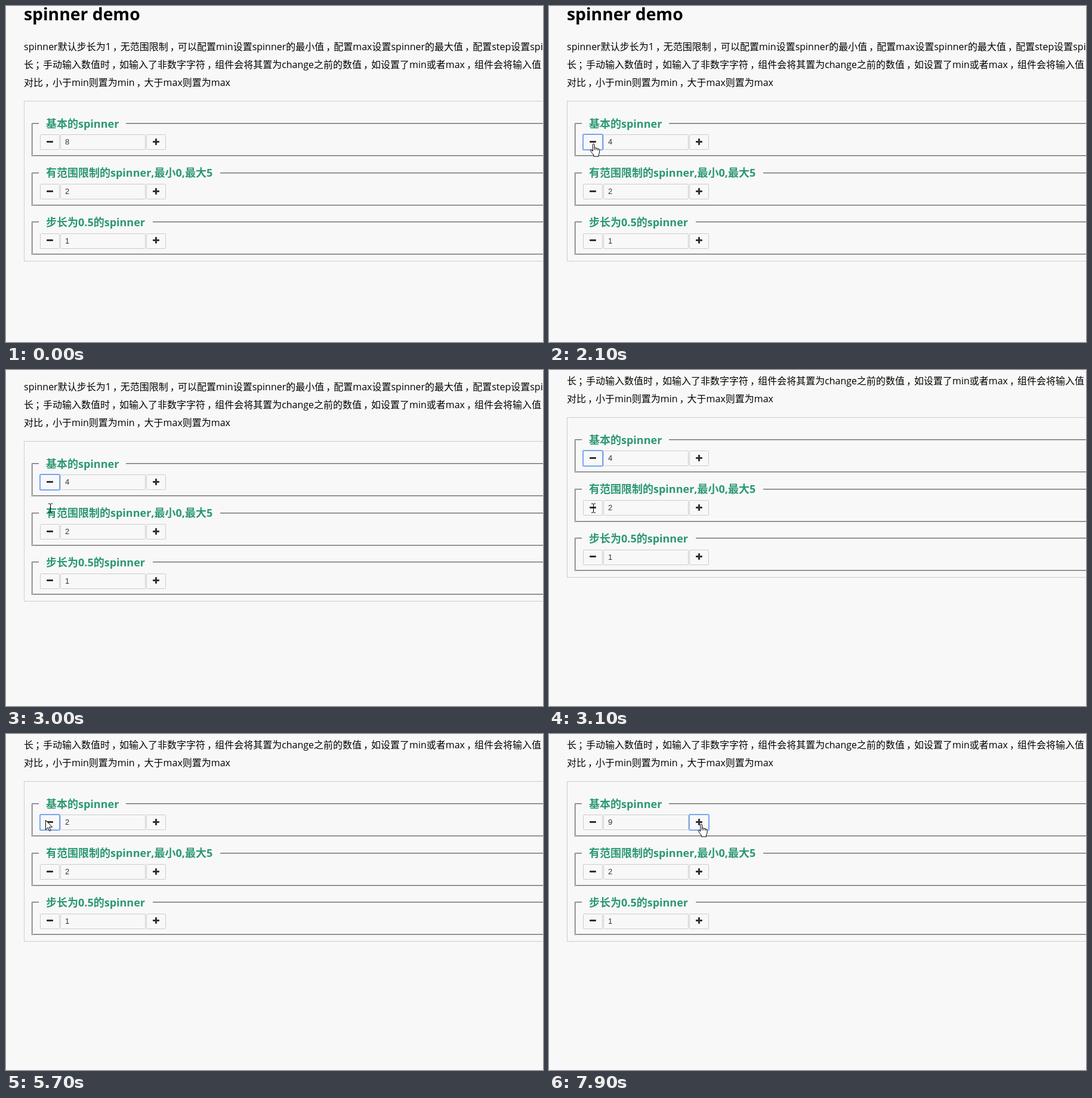
An HTML page that plays this animation: 900 by 563 pixels, repeating every 8 s.

```html
<!DOCTYPE html>
<html lang="zh-CN">
<head>
<meta charset="utf-8">
<title>spinner demo</title>
<style>
  html, body { margin: 0; width: 100%; height: 100%; overflow: hidden; background: #f8f8f8; }
  svg { display: block; }
  text { font-family: "Open Sans", "Noto Sans CJK SC", "Noto Sans CJK", sans-serif; white-space: pre; }
  .title { font-size: 28.3px; font-weight: 700; }
  .intro { font-size: 16px; }
  .legend { font-size: 18px; font-weight: 700; fill: #2b9872; }
  .value { font: 13px "Liberation Sans", Arial, sans-serif; fill: #333; }
  .thin { fill: none; stroke: #ccc; }
  .icon { fill: #332e38; }
  .ring { fill: none; stroke: #79a6f2; stroke-width: 2; }
  .dark { fill: none; stroke: #6c6c6c; }
  .light { fill: none; stroke: #c0c0c0; }
  .arrow, .hand { fill: #fff; stroke: #000; stroke-linejoin: round; }
  .beam { fill: none; stroke: #000; }
</style>
</head>
<body>
<svg width="900" height="563" viewBox="0 0 900 563">
  <g id="page">
    <text class="title" x="30" y="24">spinner demo</text>
    <g id="intro"></g>
    <rect class="thin" x="30.5" y="159.5" width="900" height="268"/>
    <g id="rows"></g>
    <rect id="ring" class="ring" y="215" width="33" height="26" rx="1.5"/>
  </g>
  <g id="cursor">
    <path class="arrow" d="M.5 .5V16.3L4.2 12.8L6.8 18.5L9 17.5L6.5 12H11.5Z"/>
    <g class="hand" transform="translate(-5.5 -.5)">
      <path d="M4.3 12.8V2Q4.3 .5 5.7 .5Q7.1 .5 7.1 2V7Q8.8 6.2 9.9 7.8Q11.8 7 12.8 8.7Q15.6 8.2 15.6 11V14.5Q15.4 17 14 18.6V21.5H6V19.6L3.3 15.8L.7 12.2Q.4 10.4 2.2 10.5Z"/>
      <path fill="none" d="M7.1 7V11M9.9 7.8V11M12.8 8.7V11.5"/>
    </g>
    <path class="beam" d="M-3.5 -7.5H-1L0 -6.5L1 -7.5H3.5M0 -6.5V6.5M-3.5 7.5H-1L0 6.5L1 7.5H3.5"/>
  </g>
</svg>
<script>
const LOOP = 8000;
const $ = id => document.getElementById(id);

const INTRO = [
  'spinner默认步长为1，无范围限制，可以配置min设置spinner的最小值，配置max设置spinner的最大值，配置step设置spinner的步',
  '长；手动输入数值时，如输入了非数字字符，组件会将其置为change之前的数值，如设置了min或者max，组件会将输入值',
  '对比，小于min则置为min，大于max则置为max'
];

// text, initial value, legend end, border top, legend baseline, control top, icon centre
const ROWS = [
  ['基本的spinner', 8, 201, 196, 204, 215, 227.5],
  ['有范围限制的spinner,最小0,最大5', 2, 359, 279, 286, 298, 310.5],
  ['步长为0.5的spinner', 1, 246, 361, 369, 381, 392.5]
];

// Fullwidth punctuation sits near the middle of its cell
const centred = line => line.replace(/([，；])(.)/g,
  '<tspan dx="3">$1</tspan><tspan dx="-3">$2</tspan>');
const box = (x, y, w) =>
  `<rect class="thin" x="${x + .5}" y="${y + .5}" width="${w - 1}" height="25" rx="1"/>`;
const bar = (x, y, w, h) =>
  `<rect class="icon" x="${x - w / 2}" y="${y - h / 2}" width="${w}" height="${h}" rx="1"/>`;

$('intro').innerHTML = INTRO.map((line, i) =>
  `<text class="intro" x="30" y="${74 + 30 * i}">${centred(line)}</text>`).join('');

$('rows').innerHTML = ROWS.map(([label, value, gap, top, base, y, mid]) => `
  <path class="dark" d="M55 ${top + .5}H43.5V${top + 56}M${gap} ${top + .5}H900M45 ${top + 54.5}H900"/>
  <path class="light" d="M55 ${top + 1.5}H44.5V${top + 54}M${gap} ${top + 1.5}H900M44 ${top + 55.5}H900"/>
  <text class="legend" x="67" y="${base}">${label}</text>
  ${box(57, y, 33)}${box(91, y, 143)}${box(235, y, 33)}
  ${bar(73.5, mid, 11, 3)}${bar(251.5, mid, 11, 3)}${bar(251.5, mid, 3, 11)}
  <text class="value" x="99" y="${y + 17}">${value}</text>`).join('');

const MINUS = [1100, 1500, 1800, 2100, 5100, 5700, 5900, 6000];
const PLUS = [6600, 6700, 6900, 7100, 7400, 7500, 7700, 7800, 7900];
const SCROLL = [[0, 0], [2900, 40], [3100, 80]];
const CURSOR = [
  [0, 'none', 0, 0],
  [100, 'arrow', 649, 89], [200, 'arrow', 592, 122], [300, 'arrow', 515, 163],
  [400, 'arrow', 425, 210], [500, 'arrow', 330, 250], [600, 'arrow', 240, 271],
  [700, 'arrow', 162, 264], [800, 'arrow', 107, 248], [900, 'hand', 74.5, 231],
  [3000, 'beam', 74.5, 231.5], [3200, 'hand', 74.5, 231],
  [4300, 'hand', 80, 224], [4400, 'beam', 75.5, 205.5], [4500, 'arrow', 62, 182],
  [4600, 'arrow', 53, 164], [4700, 'arrow', 60, 150], [4800, 'arrow', 66, 144],
  [6100, 'arrow', 82, 162], [6200, 'arrow', 128, 168], [6300, 'arrow', 182, 167],
  [6400, 'hand', 238, 157], [6500, 'hand', 255, 151]
];

const last = (track, t) => track.filter(s => s[0] <= t).pop();
const count = (clicks, t) => clicks.filter(c => c <= t).length;
const value = document.querySelector('.value');
const shapes = [...$('cursor').children];

function draw(t) {
  const downs = count(MINUS, t), ups = count(PLUS, t);
  value.textContent = 8 - downs + ups;
  $('ring').setAttribute('visibility', downs ? 'visible' : 'hidden');
  $('ring').setAttribute('x', ups ? 235 : 57);
  $('page').setAttribute('transform', `translate(0 ${-last(SCROLL, t)[1]})`);
  const [, kind, x, y] = last(CURSOR, t);
  $('cursor').setAttribute('transform', `translate(${x} ${y})`);
  for (const s of shapes) s.style.display = s.classList.contains(kind) ? '' : 'none';
}

const start = performance.now();
function tick() {
  draw((performance.now() - start) % LOOP);
  requestAnimationFrame(tick);
}
tick();
</script>
</body>
</html>
```
